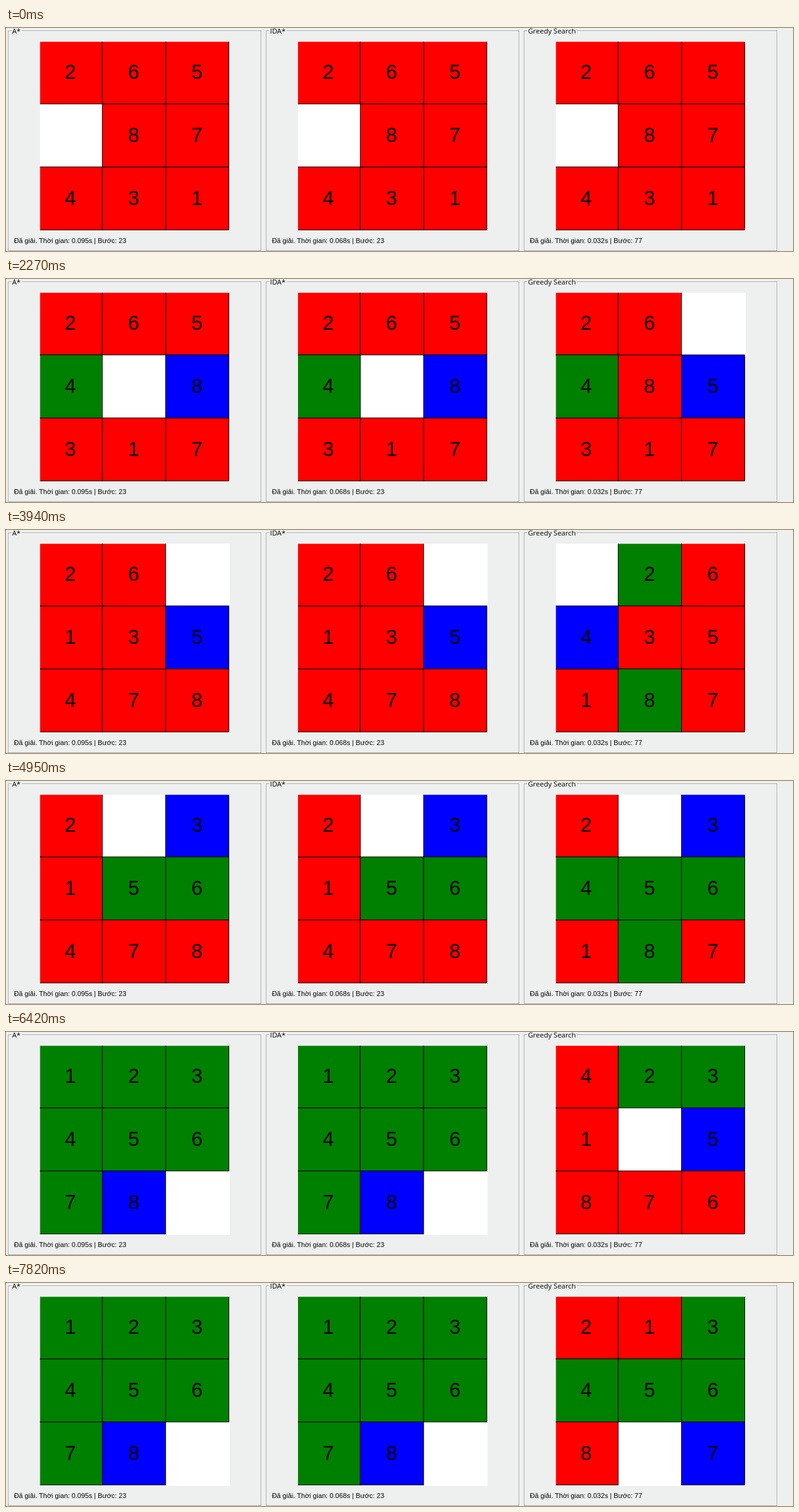
Recreate the animation shown at these times as an HTML page. Size 1280 by 364 pixels, loop 8000 ms.

```html
<!DOCTYPE html>
<html lang="vi">
<head>
<meta charset="utf-8">
<title>8-puzzle</title>
<style>
  html, body { margin: 0; width: 100%; height: 100%; overflow: hidden; background: #eef0ef; }
  #stage { display: block; width: 1280px; height: 364px; }
  .frame { fill: none; stroke: #a6a8a7; }
  .frame.light { stroke: #fcfcfc; }
  .gap { fill: #eef0ef; }
  .title { font: 11.5px "Open Sans", sans-serif; }
  .status { font: 11.15px "Liberation Sans", Arial, sans-serif; }
  .tile rect { stroke: #000; }
  .tile text { font: 32px "Liberation Sans", Arial, sans-serif; text-anchor: middle; }
</style>
</head>
<body>
<svg id="stage" viewBox="0 0 1280 364"></svg>
<script>
const LOOP = 8000;
const PANEL_PITCH = 419.5;
const CELL = 100;
const BOARD_SIZE = 308.7;
const START = [2, 6, 5, 0, 8, 7, 4, 3, 1];
const STEP = { U: -3, D: 3, L: -1, R: 1 };
const SHORTEST = "DRRULDLURDRUULDRULLDDRR";
const GREEDY = "DRRUULLDDRULURDRULLDDRRULLURDRDL";

// Runs of moves, 200 ms apart: [start time, number of moves]
const RUNS = [[1470, 7], [2940, 9], [4750, 6], [6020, 10]];
const moveTimes = RUNS.flatMap(([start, count]) =>
  Array.from({ length: count }, (_, i) => start + 200 * i));

const PANELS = [
  { title: "A*", gap: 17, seconds: "0.095", steps: 23, moves: SHORTEST },
  { title: "IDA*", gap: 28, seconds: "0.068", steps: 23, moves: SHORTEST },
  { title: "Greedy Search", gap: 81, seconds: "0.032", steps: 77, moves: GREEDY },
];

function add(parent, tag, attrs = {}, text = "") {
  const node = document.createElementNS("http://www.w3.org/2000/svg", tag);
  for (const key in attrs) node.setAttribute(key, attrs[key]);
  node.textContent = text;
  return parent.appendChild(node);
}

function buildPanel({ title, gap, seconds, steps, moves }, index) {
  const panel = add(stage, "g", { transform: `translate(${index * PANEL_PITCH})` });
  add(panel, "rect", { class: "frame light", x: 4.8, y: 5.5, width: 411, height: 359 });
  add(panel, "rect", { class: "frame", x: 3.8, y: 4.5, width: 411, height: 359 });
  add(panel, "rect", { class: "gap", x: 9, y: 0, width: gap, height: 14 });
  add(panel, "text", { class: "title", x: 10, y: 9 }, title);
  add(panel, "text", { class: "status", x: 13, y: 351 },
    `Đã giải. Thời gian: ${seconds}s | Bước: ${steps}`);

  // The view box trims the outlines on the top and left
  const board = add(panel, "svg",
    { x: 55.4, y: 22.55, width: BOARD_SIZE, height: BOARD_SIZE, viewBox: "2 2 300 300" });
  add(board, "rect", { width: 302, height: 302, fill: "#fff" });
  const tiles = START.map((_, value) => {
    if (!value) return null;
    const tile = add(board, "g", { class: "tile" });
    add(tile, "rect", { x: 0.5, y: 0.5, width: CELL, height: CELL });
    add(tile, "text", { x: 50, y: 61 }, value);
    return tile;
  });
  return { tiles, moves };
}

function boardAfter(moves) {
  const cells = [...START];
  let blank = cells.indexOf(0), moved = 0;
  for (const move of moves) {
    const next = blank + STEP[move];
    moved = cells[next];
    cells[blank] = moved;
    cells[next] = 0;
    blank = next;
  }
  return { cells, moved };
}

function drawBoard({ tiles, moves }, count) {
  const { cells, moved } = boardAfter(moves.slice(0, count));
  cells.forEach((value, cell) => {
    if (!value) return;
    const x = CELL * (cell % 3), y = CELL * Math.floor(cell / 3);
    const color = value === moved ? "#00f" : value === cell + 1 ? "#008000" : "#f00";
    tiles[value].setAttribute("transform", `translate(${x} ${y})`);
    tiles[value].firstChild.setAttribute("fill", color);
  });
}

const stage = document.getElementById("stage");
const panels = PANELS.map(buildPanel);
let shown = -1;

function render(now) {
  const time = now % LOOP;
  const count = moveTimes.filter(t => t <= time).length;
  if (count !== shown) {
    panels.forEach(panel => drawBoard(panel, count));
    shown = count;
  }
  requestAnimationFrame(render);
}
render(performance.now());
</script>
</body>
</html>
```
